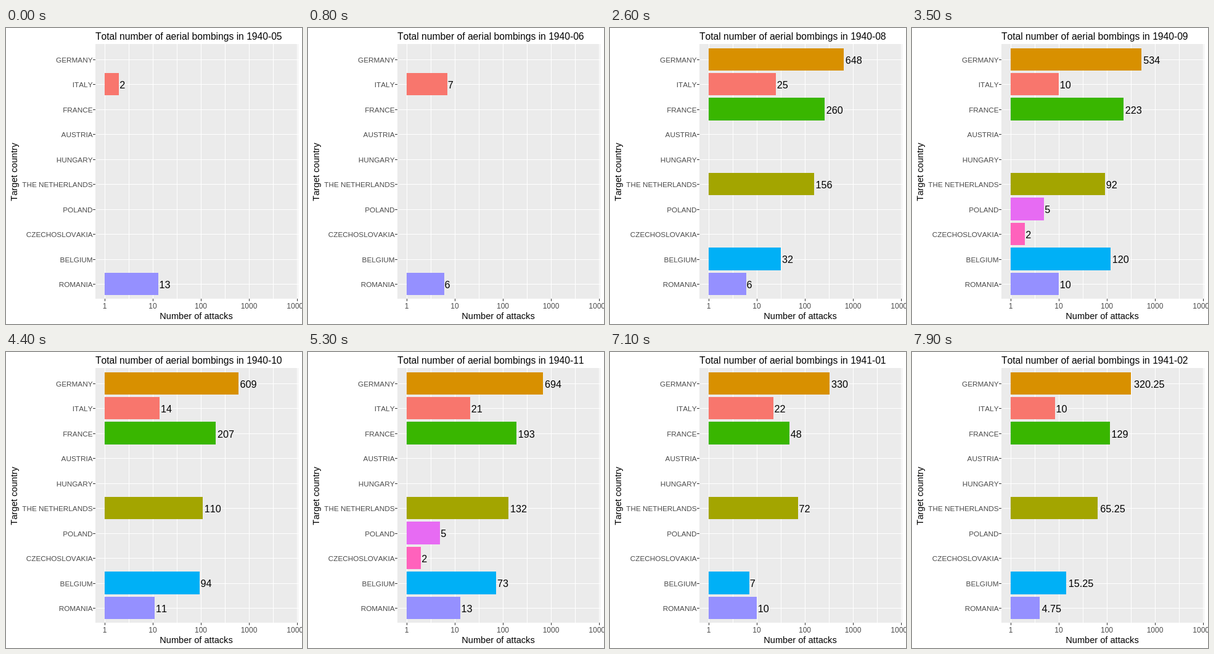
An HTML page that plays this animation: 480 px wide and 480 px high, repeating every 8 s.

```html
<!DOCTYPE html>
<html lang="en">
<head>
<meta charset="utf-8">
<title>Aerial bombings by month</title>
<style>
  html, body { margin: 0; width: 100%; height: 100%; overflow: hidden; background: #fff; }
  svg { display: block; width: 480px; height: 480px; }
  text { font-family: "Liberation Sans", Arial, sans-serif; font-kerning: none; white-space: pre; }
  rect { shape-rendering: crispEdges; }
</style>
</head>
<body>
<svg id="chart" viewBox="0 0 480 480"></svg>
<script>
const LOOP = 8000, FIRST = 500, PERIOD = 900, STEP = 100, STEPS = 4;
const LEFT = 160, DECADE = 77.9, TOP = 50.8, ROW = 40.44, LABEL = 16.2;
const PANEL = { x: 145, y: 26, width: 329, height: 413 };
const GAP = null;

// name, colour, first month with attacks, monthly counts from there on
const countries = [
  ["GERMANY", "#D89000", 2, [283, 648, 534, GAP, 694, 407, 330, 317]],
  ["ITALY", "#F8766D", 0, [2, 7, 2, 25, 10, GAP, 21, 22, 22, 6]],
  ["FRANCE", "#39B600", 2, [36, 260, 223, GAP, 193, 211, 48, 156]],
  ["AUSTRIA", "#00BF7D", 2, [6]],
  ["HUNGARY", "#00BFC4", 0, []],
  ["THE NETHERLANDS", "#A3A500", 2, [37, 156, 92, GAP, 132, 80, 72, 63]],
  ["POLAND", "#E76BF3", 4, [5, 0, 5]],
  ["CZECHOSLOVAKIA", "#FF62BC", 4, [2, 0, 2]],
  ["BELGIUM", "#00B0F6", 2, [9, 32, 120, GAP, 73, 46, 7, 18]],
  ["ROMANIA", "#9590FF", 0, [13, 6, 8, 6, 10, GAP, 13, 8, 10, 3]]
];

// A gap takes the geometric mean of its neighbours
function countAt([, , first, counts], month) {
  const i = month - first;
  return counts[i] === GAP
    ? Math.round(Math.sqrt(counts[i - 1] * counts[i + 1]))
    : counts[i] || 0;
}

// Month 0 is May 1940
function monthName(month) {
  const m = month + 4;
  return 1940 + Math.floor(m / 12) + "-" + String(m % 12 + 1).padStart(2, "0");
}

const svg = document.getElementById("chart");

function add(tag, attrs, content = "") {
  const el = document.createElementNS("http://www.w3.org/2000/svg", tag);
  for (const key in attrs) el.setAttribute(key, attrs[key]);
  el.textContent = content;
  return svg.appendChild(el);
}

const box = (x, y, width, height, fill) => add("rect", { x, y, width, height, fill });
const write = (content, x, y, size, anchor = "start", fill = "#000") =>
  add("text", { x, y, "font-size": size, "text-anchor": anchor, fill }, content);
const rowY = i => TOP + i * ROW;
const mix = (a, b, f) => a + (b - a) * f;
const logLength = n => n ? Math.log10(n) * DECADE : 0;

// Panel, grid and axes
const bottom = PANEL.y + PANEL.height;
add("rect", { ...PANEL, fill: "#EBEBEB" });
for (let i = 0; i <= 8; i++) {
  const x = Math.round(LEFT + i * DECADE / 2);
  box(x, PANEL.y, 1, PANEL.height, "#fff");
  if (i % 2) continue;
  box(x, bottom, 1, 4, "#333");
  write(String(10 ** (i / 2)), x, 455, 12, "middle", "#4D4D4D");
}
countries.forEach(([name], i) => {
  const y = Math.round(rowY(i) + 0.2);
  box(PANEL.x, y, PANEL.width, 1, "#fff");
  box(PANEL.x - 4, y, 4, 1, "#333");
  write(name, 140.5, y + 5, 11.75, "end", "#4D4D4D");
});
write("Number of attacks", 308.5, 472, 14.6, "middle");
write("Target country", 0, 0, 14.67, "middle")
  .setAttribute("transform", "translate(17.5 233.5) rotate(-90)");

const title = write("", PANEL.x, 19, 15.65);
const bars = countries.map(([, fill], i) => {
  const y0 = Math.round(rowY(i) - 0.45 * ROW);
  const y1 = Math.round(rowY(i) + 0.45 * ROW);
  return box(LEFT, y0, 0, y1 - y0, fill);
});
const labels = countries.map(() => write("", 0, 0, LABEL));

// Bars tween on the log axis, labels on the plain value;
// labels of new or leaving bars stay at their value and only change size
function drawRow(i, a, b, f) {
  const both = a && b;
  const length = mix(logLength(a), logLength(b), f);
  const size = LABEL * mix(a ? 1 : 0, b ? 1 : 0, f);
  bars[i].setAttribute("width", Math.round(length));

  const label = labels[i];
  label.style.display = size ? "" : "none";
  if (!size) return;
  label.textContent = String(both ? mix(a, b, f) : a || b);
  label.setAttribute("font-size", size);
  const end = LEFT + (both ? length : logLength(a || b));
  label.setAttribute("x", end + 0.1 * label.getComputedTextLength());
  label.setAttribute("y", rowY(i) + 0.43 * size);
}

function draw(time) {
  const t = time % LOOP - FIRST;
  const month = Math.max(0, Math.floor(t / PERIOD));
  const step = t < 0 ? 0 : Math.min(STEPS, Math.floor(t % PERIOD / STEP) + 1);
  const f = step / STEPS;
  title.textContent = "Total number of aerial bombings in " + monthName(month + Math.round(f));
  countries.forEach((c, i) => drawRow(i, countAt(c, month), countAt(c, month + 1), f));
}

const start = performance.now();
function tick() {
  draw(performance.now() - start);
  requestAnimationFrame(tick);
}
tick();
</script>
</body>
</html>
```
